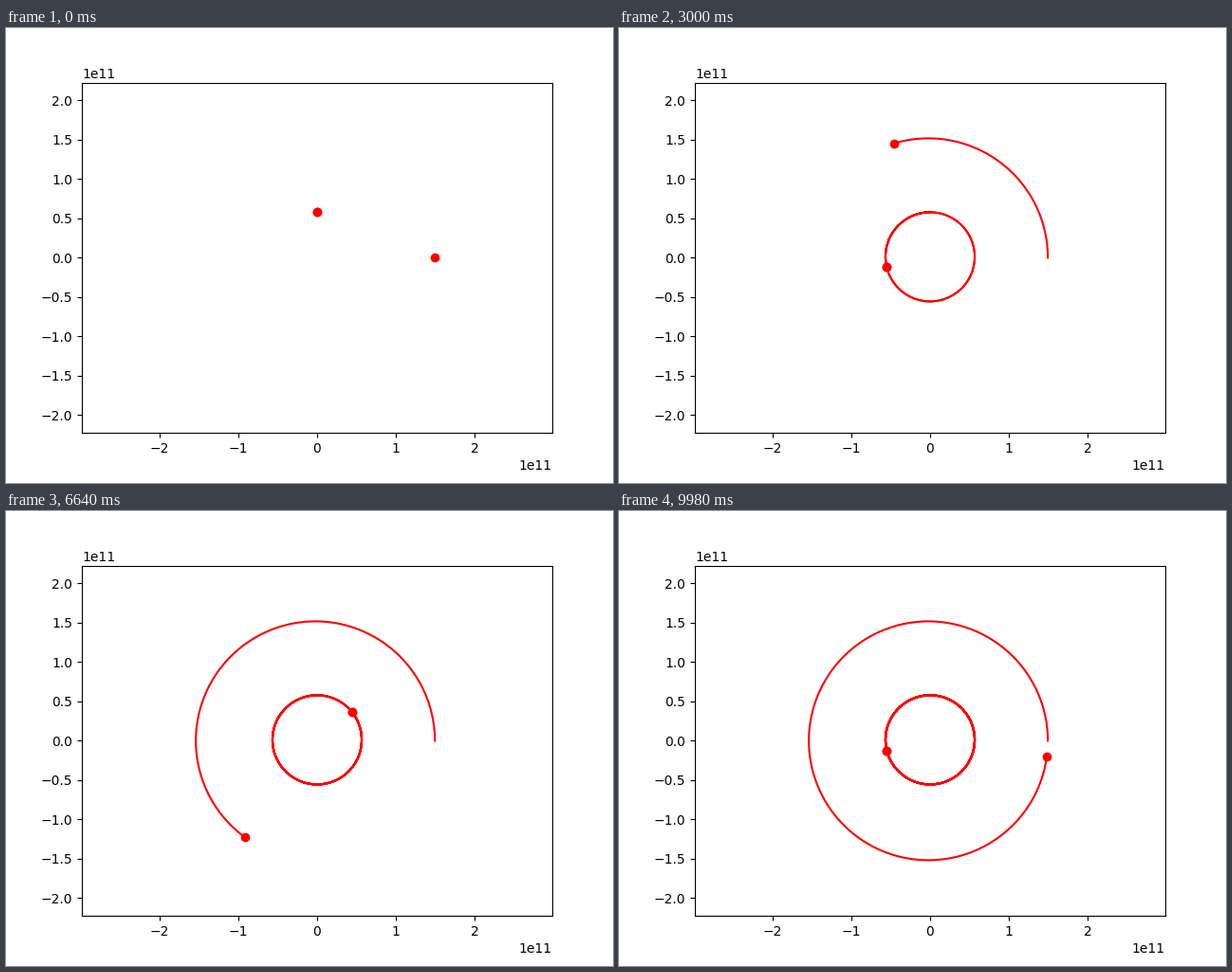
These frames come from a looping animation (640x480 px, 10000 ms). A matplotlib script:

```python
import numpy as np
import matplotlib.pyplot as plt
from matplotlib.animation import FuncAnimation

FRAMES = 500
INTERVAL = 20              # ms
STEP = 0.7329 * 86400      # simulated seconds per frame
GM = 1.3271e20             # solar gravitational parameter
SPAN = 2.988e11            # half width of the view in metres


def orbit(radius, speed, start_angle):
    """Counterclockwise orbit that starts at an apsis, one point per frame."""
    ecc = radius * speed**2 / GM - 1      # negative when starting at aphelion
    axis = radius / (1 - ecc)
    mean = np.sqrt(GM / axis**3) * STEP * np.arange(FRAMES)
    anomaly = mean.copy()
    for _ in range(8):
        slope = 1 - ecc * np.cos(anomaly)
        anomaly -= (anomaly - ecc * np.sin(anomaly) - mean) / slope
    u = axis * (np.cos(anomaly) - ecc)
    v = axis * np.sqrt(1 - ecc**2) * np.sin(anomaly)
    c, s = np.cos(start_angle), np.sin(start_angle)
    return u * c - v * s, u * s + v * c


inner = orbit(5.79e10, 47360, np.pi / 2)
outer = orbit(1.496e11, 30000, 0)
bodies = [inner, inner, outer]   # the inner orbit is drawn twice

fig, ax = plt.subplots(figsize=(6.4, 4.8), dpi=100)
height = SPAN * 369.6 / 496      # equal scale on both axes
ax.set_xticks(np.arange(-2, 3) * 1e11)
ax.set_yticks(np.arange(-4, 5) * 0.5e11)
ax.set_xlim(-SPAN, SPAN)
ax.set_ylim(-height, height)

trails = [ax.plot([], [], "r-")[0] for _ in bodies]
dots = [ax.plot([], [], "ro")[0] for _ in bodies]


def update(i):
    for (x, y), trail, dot in zip(bodies, trails, dots):
        trail.set_data(x[:i + 1], y[:i + 1])
        dot.set_data(x[i:i + 1], y[i:i + 1])
    return trails + dots


anim = FuncAnimation(fig, update, frames=FRAMES, interval=INTERVAL,
                     repeat=True, repeat_delay=0, blit=False)
plt.show()
```
